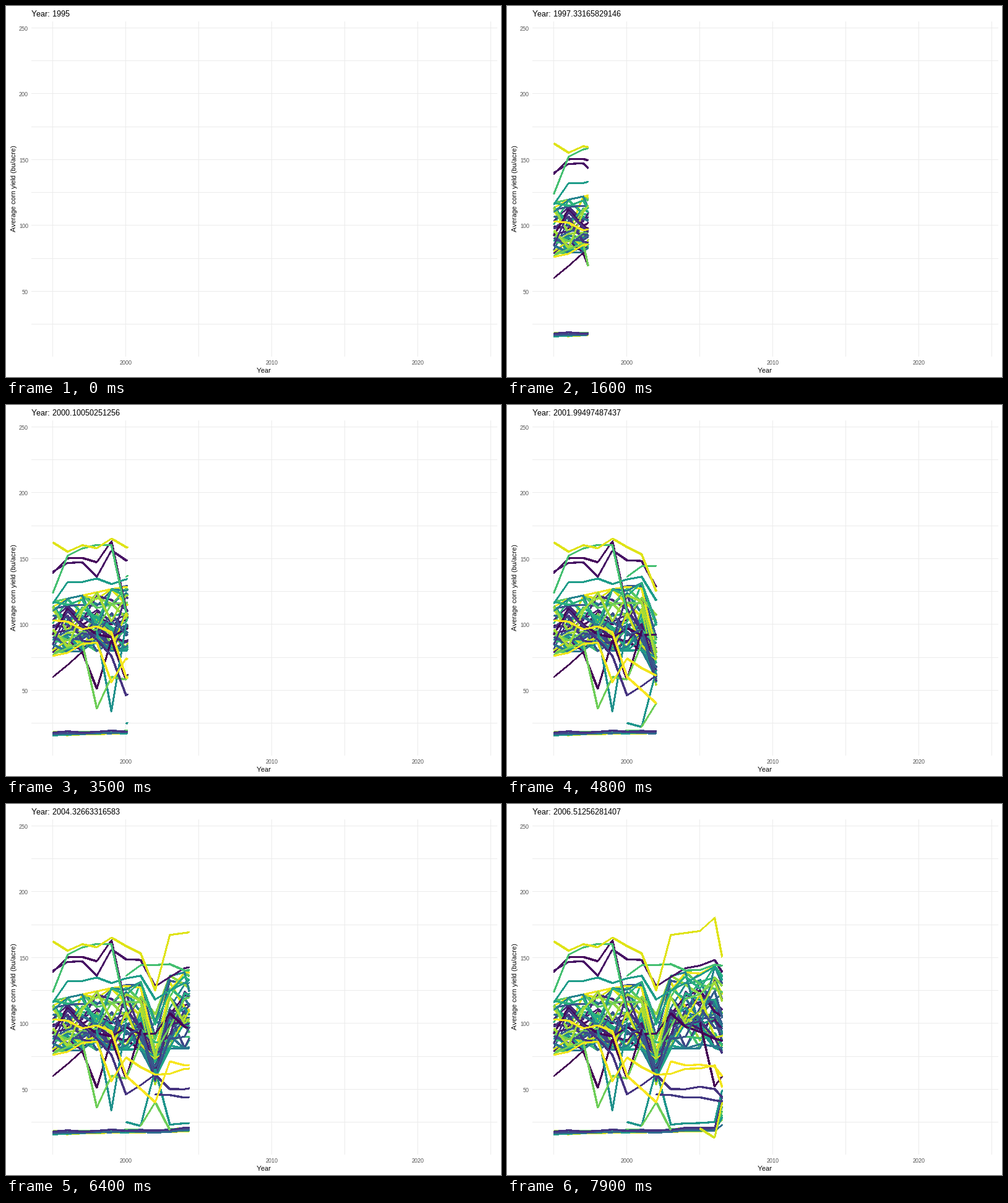
Recreate the animation shown at these times as a matplotlib script. Size 800 by 600 pixels, loop 8 s.

```python
import matplotlib.pyplot as plt
import numpy as np
from matplotlib import patheffects
from matplotlib.animation import FuncAnimation

W, H, DPI = 800, 600, 100
PT = 72 / DPI  # one pixel in points
FRAMES, INTERVAL = 80, 100
START, STEP = 1995, 29 / 199
YEARS = np.arange(START, 2008)

plt.rcParams.update({
    "font.family": "Liberation Sans",
    "text.hinting": "native",
    "text.hinting_factor": 1,
})

# Lines that leave the crowd: shade and the years where they turn
STANDOUTS = [
    (.02, {1995: 139, 1996: 150, 1998: 147, 1999: 163, 2000: 111}),
    (.05, {1995: 140, 1997: 147, 1998: 136, 1999: 156, 2001: 148, 2002: 128,
           2006: 148, 2007: 130}),
    (.55, {1995: 116, 1996: 132, 2001: 136, 2002: 118, 2006: 143, 2007: 123}),
    (.70, {1995: 124, 1996: 152, 1999: 160, 2000: 109}),
    (.70, {2000: 136, 2001: 144, 2007: 143}),
    (.00, {1995: 60, 1997: 79, 1998: 51, 1999: 88, 2000: 58, 2001: 95}),
    (.00, {2005: 100, 2006: 52, 2007: 67}),
    (.50, {1998: 94, 1999: 34, 2000: 100}),
    (.52, {2000: 25, 2001: 22, 2002: 65, 2003: 23, 2006: 25, 2007: 72}),
    (.78, {1995: 77, 1997: 86, 1998: 36, 1999: 60, 2000: 58, 2001: 85}),
    (.78, {2001: 22, 2002: 40, 2003: 19}),
    (.93, {2005: 20, 2006: 13, 2007: 65}),
    (.17, {2002: 46, 2007: 40}),
    (.15, {1995: 85, 1996: 110, 1999: 76, 2000: 46, 2002: 61, 2003: 50,
           2006: 50, 2007: 38}),
    (.99, {1995: 103, 1999: 94, 2000: 60, 2002: 40, 2003: 71, 2006: 67,
           2007: 53}),
    (.98, {1995: 76, 1998: 86, 1999: 56, 2000: 74, 2002: 61, 2006: 68,
           2007: 36}),
    (.95, {1995: 162, 1996: 155, 1999: 165, 2001: 153, 2002: 125, 2003: 167,
           2005: 170, 2006: 180, 2007: 122}),
]

rng = np.random.default_rng(12)


def px(year):
    return 75.5 + 23.6 * (year - START)


def py(value):
    return 568.05 - 2.1305 * value


def wander(mid, half, level, spread):
    """Random yields that keep near one level (-1 to 1) of a band."""
    u = level + spread * rng.standard_normal(len(YEARS))
    return mid + half * np.clip(u, -1, 1)


def turning(points):
    """Straight runs between turning points, with a slight wobble."""
    keys = list(points)
    years = np.arange(keys[0], keys[-1] + 1)
    values = np.interp(years, keys, list(points.values()))
    wobble = rng.normal(0, .015, len(years)) * ~np.isin(years, keys)
    return years, values * (1 + wobble)


def make_series():
    t = YEARS - START
    drought, last = YEARS == 2002, YEARS == 2007
    main = 98 + 1.3 * t - 27 * drought - 15 * last, 19 + 1.1 * t
    strip = 17 + .25 * t - drought + 24 * last, 1.5 + 22 * last
    series = []
    for i in range(38):
        values = wander(*main, rng.uniform(-.85, .85), .45)
        series.append((i * .618 % 1, YEARS, values))
    for i in range(9):
        values = wander(*strip, rng.uniform(-.9, .9), .3)
        series.append((.95 - i * .1, YEARS, values))
    return series + [(shade, *turning(p)) for shade, p in STANDOUTS]


def label(x, y, text, size, color="black", **kw):
    return ax.text(x, y, text, fontsize=size * PT, color=color,
                   va="baseline", **kw)


def draw_grid():
    style = dict(color="#EBEBEB", lw=PT, snap=False, zorder=0,
                 solid_capstyle="butt")
    for year in range(1995, 2026, 5):
        x = int(px(year)) + .5
        ax.plot([x, x], [25, 567], **style)
        if year % 10 == 0:
            label(x, 580, str(year), 9, "#4D4D4D", ha="center")
    for value in range(25, 251, 25):
        y = int(py(value)) + .5
        ax.plot([41, 794], [y, y], **style)
        if value % 50 == 0:
            label(36, y + 4.5, str(value), 9, "#4D4D4D", ha="right")


fig = plt.figure(figsize=(W / DPI, H / DPI), dpi=DPI, facecolor="white")
ax = fig.add_axes([0, 0, 1, 1])
ax.set(xlim=(0, W), ylim=(H, 0))
ax.axis("off")

draw_grid()
label(417, 593, "Year", 11, ha="center")
label(16, 295, "Average corn yield (bu/acre)", 11, ha="center",
      rotation=90, rotation_mode="anchor")
title = label(41, 17, "", 13, ha="left")

# Slanted two-pixel pen: rising strokes come out thinner than falling ones
pen = [patheffects.Normal(), patheffects.Stroke(offset=(PT, PT))]
lines = []
for shade, years, values in make_series():
    line, = ax.plot([], [], color=plt.cm.viridis(shade), lw=1.2 * PT,
                    antialiased=False, snap=False, solid_capstyle="butt",
                    path_effects=pen, zorder=2)
    lines.append((line, years, values))


def update(k):
    now = START + k * STEP
    title.set_text(f"Year: {now:.15g}")
    for line, years, values in lines:
        if now <= years[0]:
            line.set_data([], [])
            continue
        past = years < now
        x = np.append(years[past], min(now, years[-1]))
        y = np.append(values[past], np.interp(now, years, values))
        line.set_data(px(x), py(y))
    return [title] + [line for line, _, _ in lines]


anim = FuncAnimation(fig, update, frames=FRAMES, init_func=lambda: update(0),
                     interval=INTERVAL, repeat=True, repeat_delay=0)
plt.show()
```
